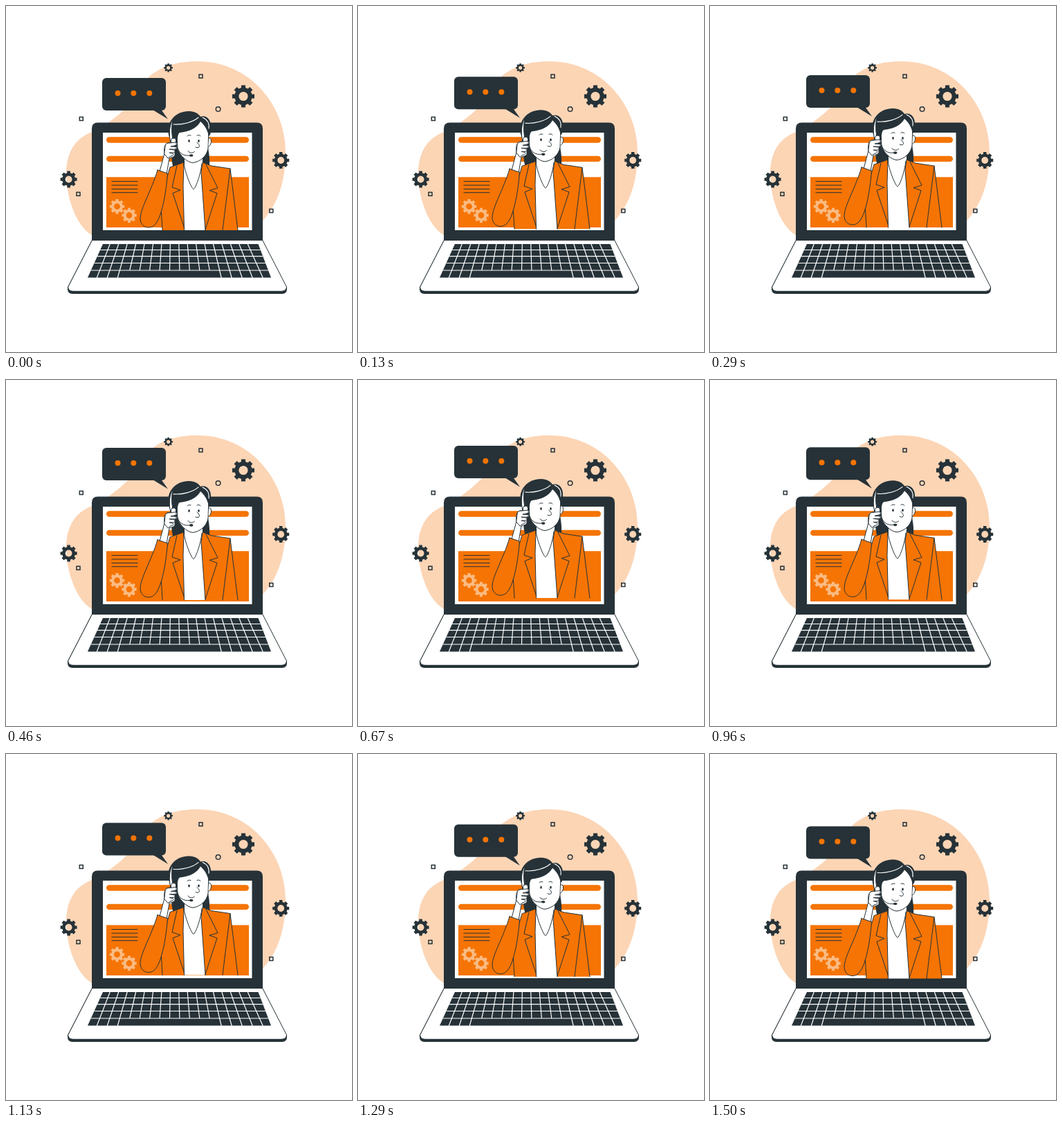
An HTML page that plays this animation: 500 px wide and 500 px high, repeating every 1540 ms.

```html
<!DOCTYPE html>
<html lang="en">
<head>
<meta charset="utf-8">
<style>
  html, body { margin: 0; width: 100%; height: 100%; overflow: hidden; background: #fff; }
  svg { display: block; width: 100%; height: 100%; }
  .dark { fill: #263238; }
  .orange { fill: #f57404; }
  .white { fill: #fff; }
  .line { fill: none; }
  .thin { stroke: #263238; stroke-width: 1; stroke-linecap: round; stroke-linejoin: round; }
  .flat { stroke: none; }
  .marks { fill: none; stroke: #263238; stroke-width: 1.5; }
  .shine { fill: none; stroke: #fff; stroke-width: 1.1; stroke-linecap: round; }
</style>
</head>
<body>
<svg viewBox="0 0 500 500">
  <path fill="#fcd5b5" d="M124 331C100 317 86 272 87 240C88 208 102 191 124 182C150 169 163 158 180 141C192 128 198 111 208 101C227 86 248 80 277 80C352 80 404 143 404 211C404 255 392 288 371 310V331Z"/>
  <g class="marks">
    <path d="M279 99h5v5h-5zM106.300 160.500h5v5h-5zM102 269.300h5v5h-5zM380.800 293.600h5v5h-5z"/>
    <circle cx="306.600" cy="149" r="3.300"/>
  </g>
  <g id="gears"></g>

  <path class="dark" d="M124 339V177Q124 168.500 132.500 168.500H362.500Q371 168.500 371 177V339Z"/>
  <path class="white" d="M140 183H355.500V324H140Z"/>
  <g class="orange">
    <rect x="145" y="189.300" width="206" height="8.400" rx="4.200"/>
    <rect x="145" y="216.700" width="206" height="8.400" rx="4.200"/>
    <path d="M145 247.300H351V320H145Z"/>
  </g>
  <path class="line thin" d="M153 253.500H190M153 259H190M153 264.500H190M153 269.700H190"/>
  <g id="panelGears"></g>

  <path class="dark" d="M124 338L89 406V409Q89 416 96 416H399Q406 416 406 409V406L371 338Z"/>
  <path class="white" d="M124.700 339L90.200 406Q90 411.700 97 411.700H398Q405 411.700 405 406L370.500 339Z"/>
  <path class="dark" d="M140 344H364.500L383 392.500H118Z"/>
  <path id="keys" class="line" stroke="#fff" stroke-width="1.200"/>

  <g id="floating">
    <rect class="dark" x="139" y="104" width="92" height="47" rx="6"/>
    <path class="dark" d="M212 150L234 163.500L223 148Z"/>
    <g class="orange">
      <circle cx="161.500" cy="126" r="4"/><circle cx="184.300" cy="126" r="4"/><circle cx="207.300" cy="126" r="4"/>
    </g>

    <path class="dark" d="M242 178C239 200 237 224 243 236L258 238L284 233L294 231C295 214 291 200 288 190Z"/>
    <g class="thin">
      <path class="white flat" d="M258 212V229L254 236L257 324H288L284 229V212Z"/>
      <path class="orange flat" d="M257 226L237 233L232 250L224 290L226 324H257.500L256 260Z"/>
      <path class="orange flat" d="M284 226L297 231L324 235L335 324H288L282 240Z"/>
      <path class="line" d="M226 324L224 290L232 250L237 233L257 226L256 260L257.500 324M288 324L282 240L284 226L297 231L324 235L335 324"/>
      <path class="line" d="M257 228C260 245 268 263 271 265C274 263 281 245 283 228M247 231L240 262L252 266L241 270.500L257.500 320M289 229L306 263L294 266.500L305 270.500L288 323M324 235L313 324"/>
      <path class="white" d="M222 239L229 213C228 206 229 200 233 198L245 196.500C249 197 249 200 246 201.500L243 202.500L247 203C249 205 247 207 244 207L244 216C242 219 239 219 236 220L232 243Z"/>
      <path class="orange" d="M219 237L233.500 242C231 275 224 309 214 317C207 323 195 320 194 308C194 292 210 268 219 237Z"/>
      <path class="white" d="M247 186L248 207C252 217 262 226 270 226.500C281 225 290 217 292 206L293 178L281 165L262 174Z"/>
      <path class="white" d="M293 191C298 189 298 201 292.500 203"/>
    </g>
    <path class="dark" d="M236 190C229 166 247 151.500 265 152C272 152.300 278 155 281 160C290 157 297 165 296 176C297 181 295 188 293 188C291 179 287 172 281 167C276 177 263 182 250 183C248 188 247 193 247 200L240 200Z"/>
    <path class="shine" d="M242 171C255 172 270 168 278 161M284 161C291 164 294 170 293 177"/>
    <g class="thin">
      <path class="white" d="M241 164C236 172 235 186 238 198L242 197C239 186 239 174 241 164Z"/>
      <rect class="white" x="238.500" y="191" width="7" height="11" rx="3"/>
      <path class="white" d="M230 203C230 199 233 198 236 198L245 197C249 198 248 201 245 201.500L238 203L246 203.500C249 205 247 207 244 207L236 207L243 208C245 210 244 212 241 212H236L241 213C243 215 241 217 238 217L234 220L229 214Z"/>
      <path class="line" d="M246 196V216M248 205C250 213 257 217 265 216M262 188C263 186.500 265 186.500 267 187M276 187C278 186 280 186.500 281 188M276 197C279 200 281 203 278 204.500C277 205 275 204.500 274 204M263 209.500C265 213 270 213 272.500 210.500"/>
    </g>
    <g class="dark">
      <ellipse cx="264.500" cy="195" rx="1.300" ry="2"/><ellipse cx="278.500" cy="195" rx="1.300" ry="2"/>
      <ellipse cx="267.700" cy="216" rx="2.800" ry="1.800"/>
    </g>
  </g>
</svg>
<script>
const $ = id => document.getElementById(id);

function gear(x, y, r, color) {
  let teeth = "";
  for (let i = 0; i < 8; i++) {
    const a = i * Math.PI / 4, c = r * Math.cos(a), s = r * Math.sin(a);
    teeth += `M${c * .7} ${s * .7}L${c} ${s}`;
  }
  return `<g transform="translate(${x} ${y})" fill="none" stroke="${color}" stroke-width="${r * .38}">
    <circle r="${r * .6}"/><path d="${teeth}"/></g>`;
}

$("gears").innerHTML = [[343, 130.5, 16], [397.2, 223, 12], [90.6, 250.5, 12], [234.6, 89.3, 6.3]]
  .map(g => gear(...g, "#263238")).join("");
$("panelGears").innerHTML = [[160.5, 289.7, 10.7], [178, 302.5, 10.7]]
  .map(g => gear(...g, "#fabb82")).join("");

// Key columns fan out from the top row; the space bar spans ten of them.
function keyLines() {
  const left = y => 140 - (y - 344) * .45;
  const right = y => 364.5 + (y - 344) * .38;
  const column = (k, y) => 148.7 + 12.65 * k + (y - 348) * (.0525 * k - .39);
  let d = "";
  for (const y of [352.5, 361.7, 371.5, 382]) d += `M${left(y)} ${y}H${right(y)}`;
  for (let k = 0; k < 17; k++) {
    const end = k > 2 && k < 12 ? 382 : 393;
    d += `M${column(k, 344)} 344L${column(k, end)} ${end}`;
  }
  return d;
}
$("keys").setAttribute("d", keyLines());

const LOOP = 1540, STEPS = 37;
function draw(now) {
  const step = Math.min(STEPS - 1, Math.floor((now % LOOP + 3) / 41.65));
  const rise = (Math.min(step + 1, STEPS - 1 - step) - 1) * 10 / 18;
  $("floating").setAttribute("transform", `translate(0 ${-rise})`);
  requestAnimationFrame(draw);
}
draw(performance.now());
</script>
</body>
</html>
```
